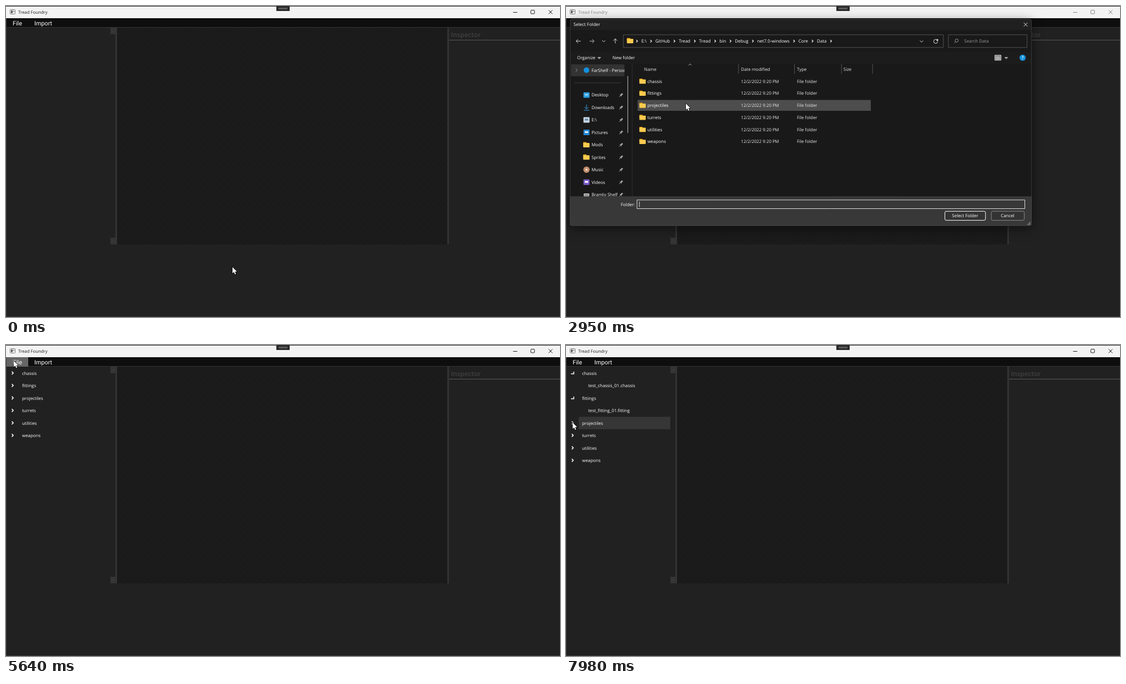
An HTML page with a canvas for the animation above (8 s loop, 998x561 px).

```html
<!DOCTYPE html>
<html lang="en">
<head>
<meta charset="utf-8">
<title>Tread Foundry</title>
<style>
html, body { margin: 0; width: 100%; height: 100%; overflow: hidden; background: #212121; }
canvas { display: block; }
</style>
</head>
<body>
<canvas id="stage" width="998" height="561"></canvas>
<script>
const c = document.getElementById('stage').getContext('2d');
c.textRendering = 'geometricPrecision';
const LOOP = 8000, ROW = 22.5;
const MENU_OPEN = 1250, MENU_PICK = 1720;
const DIALOG_OPEN = 2780, DIALOG_CLOSE = 4320, TREE_SHOWN = 4450;
const UI = '"Open Sans", "Noto Sans", sans-serif';
const MENU = 'Roboto, sans-serif';
const NAMES = ['chassis', 'fittings', 'projectiles', 'turrets', 'utilities', 'weapons'];

// Pointer moves: from time, to time, x, y
const MOVES = [
  [210, 650, 75, 76], [830, 1080, 20, 28], [1280, 1560, 25, 56], [1700, 2460, 120, 142],
  [2490, 2620, 216, 172], [2780, 2900, 216, 176], [3480, 3820, 705, 369], [4400, 4690, 100, 160],
  [4810, 4880, 50, 120], [4900, 5500, 14, 28], [5620, 5850, 11, 48], [6060, 6560, 9, 181],
  [6650, 7000, 11, 92], [7250, 7550, 14, 134], [7720, 7940, 12, 140]
];

const clamp = v => Math.max(0, Math.min(1, v));
const ramp = (t, from, span) => clamp((t - from) / span);

function pointer(t) {
  let x = 408, y = 471;
  for (const [from, to, tx, ty] of MOVES) {
    const p = ramp(t, from, to - from), e = p * p * (3 - 2 * p);
    x += (tx - x) * e;
    y += (ty - y) * e;
  }
  return { x, y };
}

function rect(x, y, w, h, fill) { c.fillStyle = fill; c.fillRect(x, y, w, h); }

function box(x, y, w, h, r, fill, stroke) {
  c.beginPath();
  c.roundRect(x, y, w, h, r);
  if (fill) { c.fillStyle = fill; c.fill(); }
  if (stroke) { c.strokeStyle = stroke; c.lineWidth = 1; c.stroke(); }
}

function line(color, width, ...p) {
  c.beginPath();
  for (let i = 0; i < p.length; i += 2) c.lineTo(p[i], p[i + 1]);
  c.strokeStyle = color;
  c.lineWidth = width;
  c.stroke();
}

function dot(x, y, r, fill, stroke) {
  c.beginPath();
  c.arc(x, y, r, 0, 7);
  if (fill) { c.fillStyle = fill; c.fill(); }
  if (stroke) { c.strokeStyle = stroke; c.lineWidth = 1; c.stroke(); }
}

// y is the optical middle of the line
function text(s, x, y, size = 7.95, color = '#fff', family = UI, weight = 400) {
  c.font = `${weight} ${size}px ${family}`;
  c.fillStyle = color;
  c.fillText(s, x, y + size * 0.36);
}

// Points right, then turned by quarter turns
function chevron(x, y, s, turns = 0, color = '#ddd', width = 1, shaft = 0) {
  c.save();
  c.translate(x, y);
  c.rotate(turns * Math.PI / 2);
  line(color, width, -s / 2, -s, s / 2, 0, -s / 2, s);
  if (shaft) line(color, width, -shaft, 0, s / 2, 0);
  c.restore();
}

const arrow = (x, y, turns, color) => chevron(x, y, 3.5, turns, color, 1, 6.5);

function cross(x, y, color) {
  line(color, 1, x - 3.5, y - 3.5, x + 3.5, y + 3.5);
  line(color, 1, x + 3.5, y - 3.5, x - 3.5, y + 3.5);
}

function caretDown(x, y) {
  for (let i = 0; i < 3; i++) rect(x - 3 + i, y - 1 + i, 6 - 2 * i, 1, '#ccc');
}

function folder(x, y) {
  box(x, y - 5, 6, 5, 1, '#e8a317');
  box(x, y - 3.5, 11.5, 8, 1, '#fccb4f');
}

function pin(x, y) {
  line('#aaa', 1, x - 3.5, y + 3.5, x, y);
  line('#aaa', 2.6, x - 1, y + 1, x + 2.6, y - 2.6);
  line('#aaa', 1, x - 2.5, y - 1, x + 1, y + 2.5);
}

const checker = (() => {
  const tile = document.createElement('canvas');
  tile.width = tile.height = 12;
  const g = tile.getContext('2d');
  g.fillStyle = '#1b1b1b';
  g.fillRect(0, 0, 12, 12);
  g.fillStyle = '#1a1a1a';
  g.fillRect(0, 0, 6, 6);
  g.fillRect(6, 6, 6, 6);
  return c.createPattern(tile, 'repeat');
})();

function titleBar(active) {
  const ink = active ? '#1a1a1a' : '#858585';
  rect(0, 0, 998, 22, '#f3f3f3');
  rect(0, 0, 998, 1, '#2c2c2c');
  box(7.5, 6.5, 9, 8, 1, '#fff', '#777');
  rect(9, 8, 3, 5, '#555');
  rect(13, 8, 2, 3, '#999');
  text('Tread Foundry', 22, 11, 7.8, ink);
  line(ink, 1, 913.5, 11.5, 921, 11.5);
  box(945.5, 7.5, 6.5, 6.5, 1, null, ink);
  cross(981, 11, ink);
  rect(487, 0, 24, 9, '#2a2a2a');
  rect(491, 3, 16, 3, '#5c5c5c');
}

function appWindow(t, at) {
  rect(0, 0, 998, 561, '#212121');
  titleBar(t < 1750 || t > 4370);
  rect(0, 22, 998, 16, '#0e0e0e');
  rect(0, 38, 998, 1, '#343434');
  rect(200, 39, 595, 391, checker);
  for (const x of [197, 795]) rect(x, 39, 3, 391, '#333');
  for (const y of [39, 418]) {
    rect(188, y, 12, 12, '#343434');
    rect(191, y + 6, 5, 1, '#3f3f3f');
  }
  text('Inspector', 801.5, 52, 11.8, '#404040', UI, 600);
  rect(798, 61, 200, 1, '#595959');
  rect(0, 22, 1, 539, '#3a3a3a');
  rect(0, 560, 998, 1, '#383838');

  const opened = t > MENU_OPEN && t < MENU_PICK;
  if (opened || (at.x < 40 && at.y > 22 && at.y < 39)) rect(1, 22, 39, 17, '#666');
  text('File', 12, 31, 10.8, '#fff', MENU);
  text('Import', 51, 31, 10.8, '#fff', MENU);
}

function fileMenu(t, at) {
  const alpha = ramp(t, MENU_OPEN, 120) * (1 - ramp(t, MENU_PICK, 120));
  if (!alpha) return;
  c.save();
  c.globalAlpha = alpha;
  c.shadowColor = 'rgba(0,0,0,.5)';
  c.shadowBlur = 4;
  rect(1, 39, 135, 79, '#2f2f2f');
  c.shadowBlur = 0;
  if (at.y > 50 && at.y < 73) rect(1, 50, 135, 23, '#484848');
  rect(1, 79, 135, 1, '#606060');
  text('Set Working Directory', 17.5, 62, 10.65, '#fff', MENU);
  text('Exit', 17.5, 96, 10.65, '#fff', MENU);
  c.restore();
}

function treeRows(t) {
  const child = { chassis: t > 5950 && 'test_chassis_01.chassis', fittings: t > 7150 && 'test_fitting_01.fitting' };
  return NAMES.flatMap(name => child[name]
    ? [{ name, open: true }, { name: child[name], leaf: true }]
    : [{ name }]);
}

// The highlight trails the pointer: average of recent pointer positions
function glow(t, y) {
  let sum = 0;
  for (let lag = 60; lag < 180; lag += 20) {
    const at = pointer(t - lag);
    if (t - lag > TREE_SHOWN && at.x < 188 && Math.abs(at.y - y) < ROW / 2) sum++;
  }
  return sum / 6;
}

function tree(t) {
  if (t < TREE_SHOWN) return;
  treeRows(t).forEach(({ name, open, leaf }, i) => {
    const y = 51 + i * ROW;
    c.globalAlpha = glow(t, y);
    rect(23, y - 11.5, 165, ROW, '#363636');
    c.globalAlpha = 1;
    text(name, leaf ? 40 : 29, y, 7.9);
    if (open) line('#fff', 1.5, 14, y - 3, 14, y + 1, 9, y + 1);
    else if (!leaf) chevron(11.8, y - 0.5, 2.6, 0, '#fff', 1.5);
  });
}

const tileIcon = (fill, mark) => y => {
  box(30.5, y - 5, 11, 10, 1, fill);
  rect(33, y - 2, 6, 3, mark);
};
const folderIcon = y => folder(30, y);
const SIDE = {
  'Desktop': tileIcon('#2b9fe0', '#8fd0f5'),
  'Downloads': y => { arrow(36, y + 1, 1, '#3aa0e8'); rect(31, y + 4.5, 10, 1, '#3aa0e8'); },
  'E:\\': tileIcon('#c9d6e2', '#5e88aa'),
  'Pictures': tileIcon('#2687d4', '#e6f4ff'),
  'Mods': folderIcon,
  'Sprites': folderIcon,
  'Music': y => { dot(36, y, 5.7, '#c58f6d'); dot(36, y, 1.7, '#fff'); },
  'Videos': tileIcon('#7a5bc7', '#fff'),
  'Bramlo Shelf': y => { box(31, y - 2, 10, 5, 1, '#d5d5d5'); rect(32, y, 8, 1.5, '#555'); }
};

function sidebar() {
  c.save();
  c.beginPath();
  c.rect(8, 104, 96.5, 240);
  c.clip();
  rect(8, 105, 97, 21.5, '#333');
  chevron(18, 115.5, 3, 0, '#999');
  dot(36, 115.5, 5, '#1490df');
  text('FarShelf - Personal', 45, 115.5);
  rect(14, 138, 84, 1, '#3a3a3a');
  Object.entries(SIDE).forEach(([name, icon], i) => {
    const y = 160.5 + i * ROW;
    icon(y);
    text(name, 45, y);
    pin(98.5, y);
  });
  c.restore();
  rect(110, 126, 1.3, 103, '#9a9a9a');
  rect(118, 104, 1, 240, '#303030');
}

function fileList(at) {
  const soft = '#e8e8e8';
  text('Name', 140, 113.5, 7.95, soft);
  text('Date modified', 315, 113.5, 7.95, soft);
  text('Type', 416, 113.5, 7.95, soft);
  text('Size', 500, 113.5, 7.95, soft);
  for (const x of [310, 411, 496, 552]) rect(x, 104, 1, 18, '#555');
  chevron(223, 105.5, 2.8, 3, '#bbb');
  NAMES.forEach((name, i) => {
    const y = 135.7 + i * 21.8;
    if (at.x > 129 && at.x < 550 && Math.abs(at.y - y) < 11) rect(128.4, y - 9.9, 421, 19.6, '#4d4d4d');
    folder(131.5, y);
    text(name, 146, y);
    text('12/2/2022 9:20 PM', 315, y, 7.85, soft);
    text('File folder', 416, y, 7.95, soft);
  });
}

function toolbar() {
  text('Select Folder', 12.5, 33, 8.1);
  cross(829, 33, '#ddd');
  arrow(19, 63, 2, '#ddd');
  arrow(48, 63, 0, '#bbb');
  chevron(67, 63, 2.8, 1);
  arrow(88, 60.5, 3, '#ddd');

  box(102.5, 51.5, 578, 23, 0, null, '#535353');
  box(689.5, 51.5, 142, 23, 0, null, '#535353');
  folder(109, 62.5);
  let x = 135;
  for (const part of ['E:\\', 'GitHub', 'Tread', 'Tread', 'bin', 'Debug', 'net7.0-windows', 'Core', 'Data', '']) {
    chevron(x - 8, 63, 2.2, 0, '#fff', 1.2);
    text(part, x, 63);
    x += c.measureText(part).width + 16;
  }
  chevron(641, 63.5, 2.8, 1);
  c.beginPath();
  c.arc(666.5, 63.5, 3.6, 0, 5.2);
  c.strokeStyle = '#ddd';
  c.stroke();
  rect(668, 59.5, 3, 3, '#ddd');
  dot(704.5, 62, 2.8, null, '#999');
  line('#999', 1, 702.5, 64, 700, 66.5);
  text('Search Data', 718, 63, 7.95, '#999');

  text('Organize', 19, 93);
  caretDown(59, 93);
  text('New folder', 83, 93);
  box(773.5, 88.5, 11, 9, 0, '#777', '#ddd');
  for (const y of [91, 93, 95]) rect(775, y, 8, 1, '#ddd');
  caretDown(794, 93);
  dot(823.5, 93, 5.6, '#1793dc');
  text('?', 821.8, 93, 8, '#fff', UI, 600);
}

function footer(t) {
  text('Folder:', 98, 358);
  box(127.2, 350.2, 700.3, 15.7, 0, null, '#dedede');
  if (Math.floor((t - DIALOG_OPEN) / 530) % 2 === 0) rect(131, 353, 1, 10, '#ddd');
  box(683.2, 370.7, 73.3, 16.3, 2.5, '#333', '#fff');
  text('Select Folder', 696, 378.5);
  box(767, 370.7, 59.5, 16.3, 2.5, '#333', '#8a8a8a');
  text('Cancel', 784, 378.5);
  for (let i = 0; i < 3; i++)
    for (let j = 0; j <= i; j++) rect(836 - 2 * j, 390 + 2 * i, 1.2, 1.2, '#bbb');
}

function dialog(t, at) {
  const shown = ramp(t, DIALOG_OPEN, 240), gone = ramp(t, DIALOG_CLOSE, 200);
  if (!shown || gone === 1) return;
  const scale = 1 - 0.1 * (1 - shown) ** 3 - 0.1 * gone ** 2;
  c.save();
  c.globalAlpha = clamp(shown * 1.6) * (1 - gone);
  c.translate(423, 210);
  c.scale(scale, scale);
  c.translate(-423, -210);
  c.shadowColor = 'rgba(0,0,0,.5)';
  c.shadowBlur = 20;
  c.shadowOffsetY = 5;
  box(6, 23, 834, 374, 4, '#191919');
  c.shadowColor = 'transparent';
  box(6, 23, 834, 20, [4, 4, 0, 0], '#202020');
  rect(6, 82, 834, 22, '#1c1c1c');
  box(6, 343.5, 834, 53.5, [0, 0, 4, 4], '#383838');
  toolbar();
  sidebar();
  fileList(at);
  footer(t);
  box(6.5, 23.5, 833, 373, 4, null, 'rgba(90,90,90,.45)');
  c.restore();
}

function drawPointer({ x, y }) {
  c.save();
  c.translate(x, y);
  c.lineJoin = 'round';
  const shape = new Path2D('M0 0V11.3L2.6 8.8 4.4 13 6.2 12.2 4.5 8.2 8 8Z');
  c.strokeStyle = '#000';
  c.lineWidth = 1.2;
  c.stroke(shape);
  c.fillStyle = '#fff';
  c.fill(shape);
  c.restore();
}

function draw(t) {
  const at = pointer(t);
  appWindow(t, at);
  tree(t);
  fileMenu(t, at);
  dialog(t, at);
  drawPointer(at);
}

const start = performance.now();
function tick() {
  draw((performance.now() - start) % LOOP);
  requestAnimationFrame(tick);
}
tick();
</script>
</body>
</html>
```
